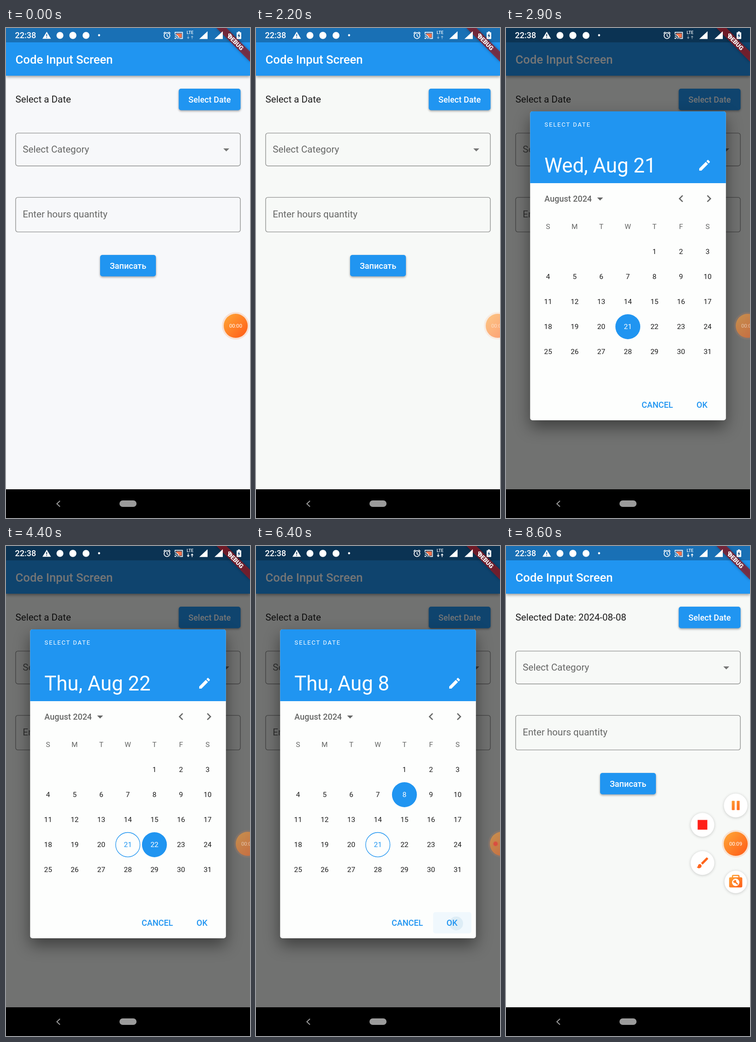
Write an HTML page with a canvas that moves like this. It is 529 px wide and 1058 px high and loops after 8700 ms.

```html
<!DOCTYPE html>
<html lang="en">
<head>
<meta charset="utf-8">
<title>Date picker demo</title>
<style>
  html, body { margin: 0; width: 100%; height: 100%; overflow: hidden; background: #000; }
  canvas { display: block; width: 100vw; height: 100vh; }
</style>
</head>
<body>
<canvas id="stage" width="529" height="1058"></canvas>
<script>
const ctx = document.getElementById('stage').getContext('2d');
const W = 529, H = 1058, LOOP = 8700, STEP = 100, DP = 9 / 7;
const BLUE = '#2095f1', GREY = '#666766', INK = '#1e1e1e';

const ICONS = {
  edit: 'M3 17.25V21h3.75L17.81 9.94l-3.75-3.75L3 17.25zM20.71 7.04c.39-.39.39-1.02 0-1.41l-2.34-2.34c-.39-.39-1.02-.39-1.41 0l-1.83 1.83 3.75 3.75 1.83-1.83z',
  left: 'M15.41 7.41L14 6l-6 6 6 6 1.41-1.41L10.83 12z',
  right: 'M10 6L8.59 7.41 13.17 12l-4.58 4.59L10 18l6-6z',
  drop: 'M7 10l5 5 5-5z',
  brush: 'M7 14c-1.66 0-3 1.34-3 3 0 1.31-1.16 2-2 2 .92 1.22 2.49 2 4 2 2.21 0 4-1.79 4-4 0-1.66-1.34-3-3-3zM20.71 4.63l-1.34-1.34c-.39-.39-1.02-.39-1.41 0L9 12.25 11.75 15l8.96-8.96c.39-.39.39-1.02 0-1.41z'
};

const clamp = v => Math.max(0, Math.min(1, v));
const ramp = (t, a, b) => clamp((t - a) / (b - a));
const ease = p => p * p * (3 - 2 * p);
const easeOut = p => 1 - (1 - p) ** 3;
const lerp = (a, b, p) => a + (b - a) * p;

function text(s, x, y, size, color, { weight = 400, align = 'left', spacing = 0 } = {}) {
  ctx.font = `${weight} ${size}px Roboto, sans-serif`;
  ctx.textAlign = align;
  ctx.letterSpacing = spacing + 'px';
  ctx.fillStyle = color;
  ctx.fillText(s, x, y);
}

function rect(x, y, w, h, color) {
  ctx.fillStyle = color;
  ctx.fillRect(x, y, w, h);
}

function round(x, y, w, h, r, color) {
  ctx.beginPath();
  ctx.roundRect(x, y, w, h, r);
  ctx.fillStyle = color;
  ctx.fill();
}

function circle(x, y, r, color) {
  ctx.beginPath();
  ctx.arc(x, y, r, 0, Math.PI * 2);
  ctx.fillStyle = color;
  ctx.fill();
}

function poly(color, ...p) {
  ctx.beginPath();
  for (let i = 0; i < p.length; i += 2) ctx.lineTo(p[i], p[i + 1]);
  ctx.fillStyle = color;
  ctx.fill();
}

function line(color, width, ...p) {
  ctx.beginPath();
  for (let i = 0; i < p.length; i += 2) ctx.lineTo(p[i], p[i + 1]);
  ctx.strokeStyle = color;
  ctx.lineWidth = width;
  ctx.stroke();
}

function ring(x, y, r, color, width, from = 0, to = Math.PI * 2) {
  ctx.beginPath();
  ctx.arc(x, y, r, from, to);
  ctx.strokeStyle = color;
  ctx.lineWidth = width;
  ctx.stroke();
}

function outline(x, y, w, h, r, color, width) {
  ctx.beginPath();
  ctx.roundRect(x, y, w, h, r);
  ctx.strokeStyle = color;
  ctx.lineWidth = width;
  ctx.stroke();
}

// Icon on a 24 unit grid, centred on x, y
function icon(name, x, y, color, scale = DP) {
  ctx.save();
  ctx.translate(x - 12 * scale, y - 12 * scale);
  ctx.scale(scale, scale);
  ctx.fillStyle = color;
  ctx.fill(new Path2D(ICONS[name]));
  ctx.restore();
}

function shadowed(dy, blur, alpha, draw) {
  ctx.save();
  ctx.shadowColor = `rgba(0,0,0,${alpha})`;
  ctx.shadowBlur = blur;
  ctx.shadowOffsetY = dy;
  draw();
  ctx.restore();
}

function button(label, x, y, w, h) {
  shadowed(2, 4, 0.36, () => round(x, y, w, h, 5, BLUE));
  text(label, x + w / 2, y + h / 2 + 6.4, 18, '#fff', { weight: 500, align: 'center' });
}

function form(t) {
  const p = ramp(t, 0, 600);
  rect(0, 0, W, H, `rgb(247,${lerp(248, 249, p)},${lerp(250, 247, p)})`);
  shadowed(3, 6, 0.36, () => rect(0, 0, W, 103, BLUE));
  rect(0, 0, W, 31, '#1970b5');
  text('Code Input Screen', 20.6, 76.6, 25.7, '#fff', { weight: 500 });

  const label = t < 6500 ? 'Select a Date' : 'Selected Date: 2024-08-08';
  text(label, 20.6, 161, 20.57, INK);
  button('Select Date', 374.5, 131, 134, 46.5);
  button('Записать', 204, 490, 121, 46.3);

  if (t >= 2300 && t < 2500) {
    ctx.save();
    ctx.beginPath();
    ctx.roundRect(374.5, 131, 134, 46.5, 5);
    ctx.clip();
    circle(445, 155, lerp(25, 70, ramp(t, 2300, 2400)), 'rgba(255,255,255,.18)');
    ctx.restore();
  }

  const frame = '#929392';
  outline(20.9, 226.9, 487.2, 70.8, 5, frame, 1.4);
  outline(20.9, 365.6, 487.2, 74.8, 5, frame, 1.4);
  text('Select Category', 36.3, 269, 20.57, GREY);
  text('Enter hours quantity', 36.3, 409.3, 20.57, GREY);
  icon('drop', 477.6, 262.6, '#757675');
}

function dialog(t) {
  const day = t < 4000 ? 21 : t < 5000 ? 22 : 8;
  shadowed(15, 34, 0.45, () => round(52.3, 180, 424.5, 667, 5, '#fdfefd'));
  round(52.3, 180, 424.5, 155, [5, 5, 0, 0], BLUE);
  text('SELECT DATE', 83.6, 213, 12.86, '#fff', { spacing: 1.93 });
  text(`${day === 21 ? 'Wed' : 'Thu'}, Aug ${day}`, 83.2, 312, 43.7, '#fff');
  icon('edit', 430.5, 296.4, '#fff');

  text('August 2024', 83.3, 375, 18, GREY, { weight: 500 });
  icon('drop', 204, 368.6, GREY);
  icon('left', 379.5, 368.4, GREY);
  icon('right', 440, 368.4, GREY);

  const colX = c => 91.2 + 57.65 * c;
  const center = { align: 'center' };
  [...'SMTWTFS'].forEach((s, c) => text(s, colX(c), 434.4, 15.43, GREY, center));
  for (let d = 1; d <= 31; d++) {
    const cell = d + 3, x = colX(cell % 7), y = 482.8 + 54 * Math.floor(cell / 7);
    let color = INK;
    if (d === day) {
      circle(x, y + 0.1, 27, BLUE);
      color = '#fff';
    } else if (d === 21) {
      ring(x, y + 0.1, 26.4, BLUE, 1.3);
      color = BLUE;
    }
    text(d, x, y + 5.5, 15.43, color, center);
  }

  if (t >= 6300) {
    round(384, 790.5, 83, 46, 5, 'rgba(33,150,243,.06)');
    circle(434, 815, t < 6400 ? 8 : 15, 'rgba(33,130,180,.09)');
  }
  text('CANCEL', 328, 819.6, 18, BLUE, { weight: 500, align: 'center' });
  text('OK', 425, 819.6, 18, BLUE, { weight: 500, align: 'center' });
}

function banner() {
  ctx.save();
  ctx.translate(W, 0);
  ctx.rotate(Math.PI / 4);
  shadowed(0, 6, 0.45, () => rect(-51.4, 36, 102.8, 15.4, 'rgba(150,24,32,.72)'));
  text('DEBUG', 0, 48.4, 13.1, '#fff', { weight: 900, align: 'center' });
  ctx.restore();
}

function status(t, back) {
  const white = '#fff';
  text('22:38', 19.5, 22.4, 18, white, { weight: 500 });
  poly(white, 88.3, 8, 97.5, 23.3, 79, 23.3);
  rect(87.4, 13, 1.8, 5, back);
  rect(87.4, 19.5, 1.8, 1.8, back);
  circle(117, 16, 7.5, white);
  circle(145, 16, 7.7, white);
  circle(173.5, 16, 7.5, white);
  circle(201.8, 15.6, 2.3, white);

  ring(349, 16.5, 6.3, white, 1.7);
  line(white, 1.5, 349, 12.5, 349, 17, 352, 18.8);
  line(white, 1.7, 341.6, 11.6, 345.4, 8.4);
  line(white, 1.7, 352.6, 8.4, 356.4, 11.6);

  rect(369, 11.7, 12, 9, '#f4724a');
  line(white, 1.6, 366.5, 13, 366.5, 9.4, 382.6, 9.4, 382.6, 22.6, 377, 22.6);
  poly(back, 365, 14, 370, 14, 376, 23.5, 365, 23.5);
  for (const r of [5.5, 9]) ring(366, 23.4, r, white, 1.5, -Math.PI / 2, 0);
  circle(367, 22.3, 1.5, white);

  text('LTE', 399, 13.4, 9, white, { weight: 500, align: 'center' });
  const net = t >= 3500 ? white : 'rgba(255,255,255,.4)';
  line(net, 1.4, 395, 16, 395, 22);
  poly(net, 392, 20, 398, 20, 395, 24);
  line(net, 1.4, 403.5, 18, 403.5, 24);
  poly(net, 400.5, 20, 406.5, 20, 403.5, 16);

  for (const x of [437, 470]) poly(white, x, 7, x, 23.7, x - 18, 23.7);
  text('R', 485, 21, 12, white, { weight: 700, align: 'center' });
  round(500, 9.3, 10, 14.5, 1.3, white);
  rect(503, 7.5, 4, 2.5, white);
  poly('#174a7c', 506, 11, 502, 17.3, 504.6, 17.3, 504, 22, 508, 15.7, 505.4, 15.7);
}

function navBar() {
  rect(0, 996, W, 62, '#000');
  line('#9a9a9a', 2, 117, 1021, 110.3, 1027.2, 117, 1033.4);
  round(246, 1020, 37, 14, 7, '#9b9b9b');
}

function orange(x, y, r) {
  const g = ctx.createLinearGradient(x - r * 0.7, y - r * 0.7, x + r * 0.7, y + r * 0.7);
  g.addColorStop(0, '#ff9d33');
  g.addColorStop(1, '#ff651c');
  return g;
}

function menuItem(x, y, r, p, glyph) {
  ctx.save();
  ctx.globalAlpha = p;
  ctx.translate(lerp(498, x, p), lerp(643, y, p));
  ctx.scale(p, p);
  shadowed(1, 6, 0.2, () => circle(0, 0, r, '#fff'));
  glyph(orange(0, 0, 14));
  ctx.restore();
}

function menu(p) {
  menuItem(498, 560.3, 25.7, p, fill => {
    round(-8.5, -10, 6.2, 20, 1, fill);
    round(2.3, -10, 6.2, 20, 1, fill);
  });
  menuItem(426, 602, 25.7, p, () => rect(-10.5, -10.5, 21, 21, '#ff2019'));
  menuItem(426, 684.5, 25.7, p, fill => icon('brush', 0.6, -0.4, fill, 1.3));
  menuItem(498, 725.3, 24.4, p, fill => {
    outline(-7, -14, 14, 8, 2, fill, 2.6);
    round(-14.3, -10, 28.6, 22, 3, fill);
    circle(0, 1, 8, '#fff');
    line('#ff7d25', 3, -1.5, -0.5, 4.5, 5.5);
    circle(-2, -1, 3.2, '#ff7d25');
    poly('#fff', -2, -1.8, -6, -3, -4, -5.5);
  });
}

function bubble(t) {
  const wake = easeOut(ramp(t, 7700, 8100));
  const dock = lerp(498, 524, ease(ramp(t, 900, 1400)));
  const tuck = 9 * ramp(t, 5600, 5800);
  const x = lerp(dock + tuck, 498, wake), y = 643;
  const ticks = [900, 2200, 3500, 4400, 5400, 6400, 7400, 7800, 8600];

  if (wake > 0) menu(wake);
  ctx.save();
  ctx.globalAlpha = lerp(lerp(1, 0.55, ramp(t, 1200, 1700)), 1, wake);
  circle(x, y, 29.8, 'rgba(250,140,80,.22)');
  circle(x, y, 26, orange(x, y, 26));
  if (t >= 5700 && t < 7800) {
    circle(519.3, y, 6, 'rgba(235,50,60,.35)');
    circle(519.3, y, 4.4, '#e5303c');
  } else {
    const sec = ticks.filter(k => t >= k).length;
    text('00:0' + sec, x, y + 4.1, 11.3, '#fff', { align: 'center' });
  }
  ctx.restore();
}

function draw(t) {
  ctx.clearRect(0, 0, W, H);
  form(t);
  const shade = t < 6500 ? ramp(t, 2740, 2890) : 0;
  if (shade > 0) {
    rect(0, 0, W, 996, `rgba(0,0,0,${0.54 * shade})`);
    ctx.save();
    ctx.globalAlpha = shade;
    dialog(t);
    ctx.restore();
  }
  banner();
  status(t, shade > 0.5 ? '#0b3353' : '#1970b5');
  navBar();
  bubble(t);
}

function tick(now) {
  draw(Math.floor((now % LOOP) / STEP) * STEP);
  requestAnimationFrame(tick);
}
requestAnimationFrame(tick);
</script>
</body>
</html>
```
